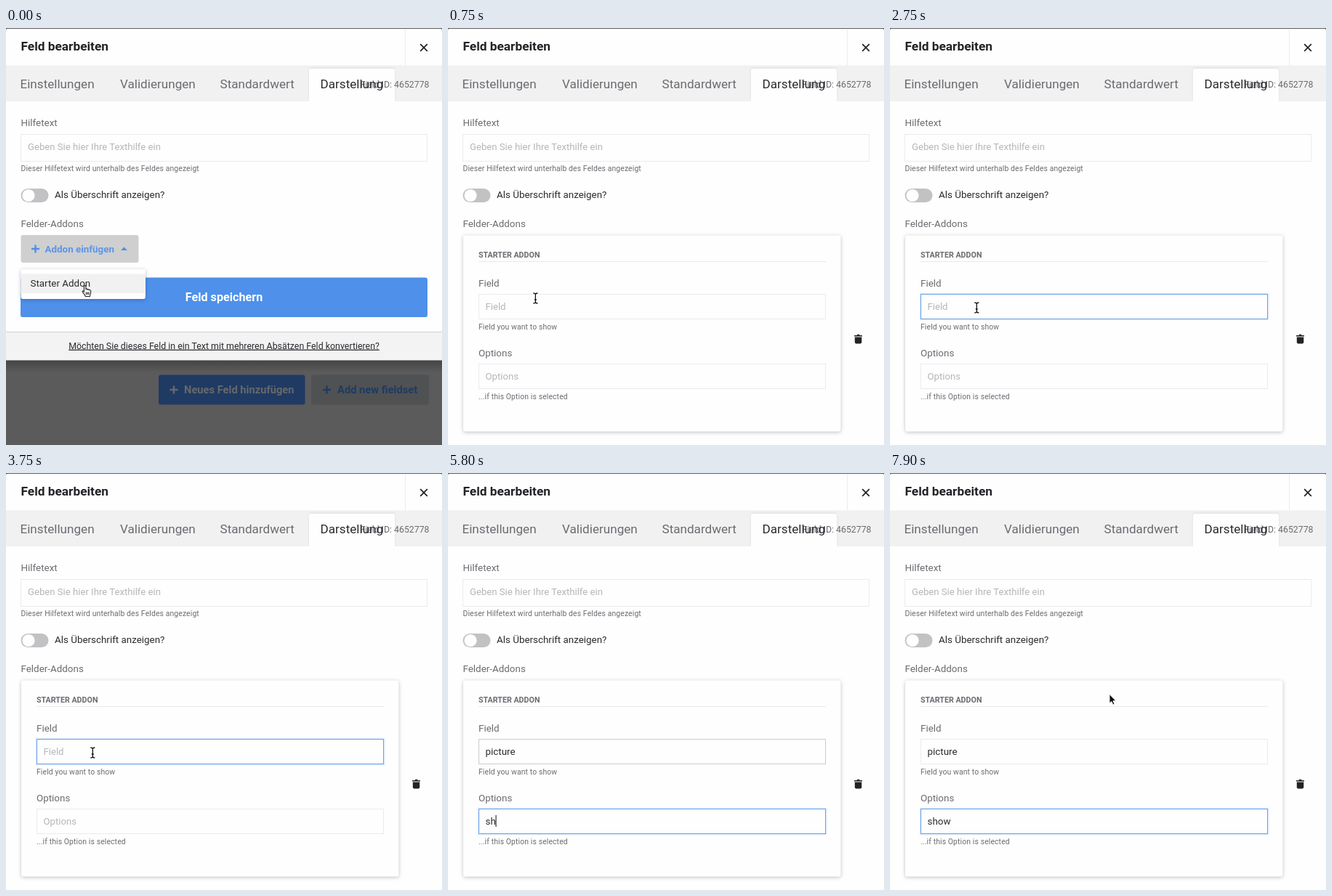
An HTML page that plays this animation: 600 by 574 pixels, repeating every 8000 ms.

```html
<!DOCTYPE html>
<html lang="de">
<head>
<meta charset="utf-8">
<title>Feld bearbeiten</title>
<style>
  html, body { margin: 0; width: 100%; height: 100%; overflow: hidden; background: #5b5b5c; }
  svg { display: block; width: 600px; height: 574px; }
  text { font: 13.4px Roboto, Arial, sans-serif; fill: #6c6b70; white-space: pre; }
  .title { font-size: 17.3px; font-weight: 700; fill: #232327; }
  .tab { font-size: 17.1px; }
  .dark { fill: #2b2b2f; }
  .hint { font-size: 13.15px; fill: #b6b5b9; }
  .help { font-size: 10.4px; letter-spacing: .12px; }
  .bold { font-weight: 700; }
  .box { fill: #fefeff; stroke: #ebeaed; }
  .card { fill: #fefeff; filter: drop-shadow(0 1px 2.5px rgba(0, 0, 0, .25)); }
  .plus { stroke-width: 2.4; fill: none; }
  .glow { fill: none; stroke: #e2eefc; stroke-width: 4; }
  .ring { fill: #fefeff; stroke: #68a0e4; }
  .caret { fill: #222; }
</style>
</head>
<body>
<svg viewBox="0 0 600 574">
  <defs>
    <path id="plus" class="plus" d="M-5.5 0H5.5M0-5.5V5.5"/>
    <path id="arrow" d="M0 0V12.6L2.9 10 4.9 14.6 7 13.7 5.1 9.2H9Z"
      fill="#111" stroke="#fff" stroke-width=".9"/>
    <g id="ibeam" fill="none">
      <path d="M-3-7Q0-7 0-5Q0-7 3-7M0-5V5M-3 7Q0 7 0 5Q0 7 3 7M-1.5 2H1.5" stroke="#fff" stroke-width="2.6"/>
      <path d="M-3-7Q0-7 0-5Q0-7 3-7M0-5V5M-3 7Q0 7 0 5Q0 7 3 7M-1.5 2H1.5" stroke="#111" stroke-width="1.3"/>
    </g>
    <path id="hand" d="M2.4 8.5V1.4C2.4-.4 4.8-.4 4.8 1.4V5.2C5.2 4.3 7 4.4 7.2 5.6C7.9 4.8 9.3 5.1 9.4 6.2C10.3 5.6 11.6 6.2 11.6 7.5V10.2C11.6 12 10.5 12.8 10.4 15H4.3C4 12.7 1.6 11.2.4 9C-.4 7.6 1.1 6.6 2.4 8.5ZM5.3 9V12.5M7.2 9V12.5M9.1 9V12.5"
      fill="#fff" stroke="#222" stroke-width="1.1"/>
    <linearGradient id="drop" x2="0" y2="1">
      <stop stop-color="#000" stop-opacity=".25"/>
      <stop offset="1" stop-color="#000" stop-opacity="0"/>
    </linearGradient>
  </defs>

  <rect width="600" height="574" fill="#5b5b5c"/>
  <rect y="1" width="600" height="580" rx="2" fill="#fefeff"/>

  <!-- header and tabs -->
  <text class="title" x="20.5" y="31">Feld bearbeiten</text>
  <path d="M549.5 1V52" stroke="#ececee"/>
  <path d="M570.2 22.2L579.8 31.8M579.8 22.2L570.2 31.8" stroke="#222226" stroke-width="1.7"/>
  <rect y="51.5" width="600" height="49.5" fill="#f1f1f2"/>
  <path d="M417 101V59Q417 56 420 56H532Q535 56 535 59V101Z" fill="#fefeff"
    style="filter:drop-shadow(0 -1px 1.5px rgba(0,0,0,.07))"/>
  <rect x="410" y="101" width="132" height="6" fill="#fefeff"/>
  <text x="582.5" y="81.5" text-anchor="end" style="font-size:12.3px">Field ID: 4652778</text>
  <text class="tab" x="19.5" y="83.3">Einstellungen</text>
  <text class="tab" x="157" y="83.3">Validierungen</text>
  <text class="tab" x="294.5" y="83.3">Standardwert</text>
  <text class="tab dark" x="432.5" y="83.3">Darstellung</text>

  <!-- general settings -->
  <text x="20.5" y="135">Hilfetext</text>
  <rect class="box" x="20.5" y="146.5" width="559" height="37"/>
  <text class="hint" x="30" y="168.2">Geben Sie hier Ihre Texthilfe ein</text>
  <text class="help" x="20.5" y="197.3">Dieser Hilfetext wird unterhalb des Feldes angezeigt</text>
  <rect x="20.5" y="221" width="38" height="19" rx="9.5" fill="#c2c1c3"/>
  <circle cx="31" cy="230.5" r="8.6" fill="#fefeff"/>
  <text class="dark" x="67" y="234.3">Als Überschrift anzeigen?</text>
  <text x="20.5" y="273.6">Felder-Addons</text>

  <!-- open menu -->
  <g id="menu">
    <rect x="20.5" y="285" width="162" height="38" rx="3" fill="#cfcfd0"/>
    <use href="#plus" x="40.5" y="304" stroke="#4e8fe6"/>
    <text class="bold" x="53.5" y="308.6" style="fill:#5a96e8">Addon einfügen</text>
    <path d="M158 306L162.5 301.5L167 306Z" fill="#4e8fe6"/>
    <rect x="20" y="343.5" width="560" height="54.5" rx="3" fill="#4e90ea"/>
    <text class="bold" x="300" y="376.4" text-anchor="middle" style="font-size:16.2px;fill:#fff">Feld speichern</text>
    <rect y="418" width="600" height="40" fill="#f3f3f4"/>
    <path d="M0 418.5H600" stroke="#cfcfd2"/>
    <text class="dark" x="300" y="441.6" text-anchor="middle"
      style="font-size:12.4px;text-decoration:underline">Möchten Sie dieses Feld in ein Text mit mehreren Absätzen Feld konvertieren?</text>
    <rect y="457.5" width="600" height="117" fill="#5b5b5c"/>
    <rect y="457.5" width="600" height="16" fill="url(#drop)"/>
    <rect x="210" y="477.5" width="201.5" height="41" rx="3" fill="#1f3b63"/>
    <use href="#plus" x="231" y="498" stroke="#66686c"/>
    <text class="bold" x="245" y="503.2" style="font-size:14.7px;fill:#66686c">Neues Feld hinzufügen</text>
    <rect x="420" y="477.5" width="162" height="41" rx="3" fill="#505153"/>
    <use href="#plus" x="441.5" y="498" stroke="#1f3b63"/>
    <text class="bold" x="456" y="503.2" style="font-size:14.7px;fill:#1f3b63">Add new fieldset</text>
    <rect class="card" x="20.5" y="332" width="171.5" height="41" rx="3"/>
    <rect x="20.5" y="338.5" width="171.5" height="26.5" fill="#f1f1f2"/>
    <text class="dark" x="33.5" y="355.8">Starter Addon</text>
  </g>

  <!-- add-on form -->
  <g id="form">
    <rect class="card" x="21" y="285.5" width="519.5" height="270" rx="3"/>
    <text class="bold" x="42" y="316.3" style="font-size:10.7px">STARTER ADDON</text>
    <path d="M42 321.5H520" stroke="#e9e8eb"/>
    <text x="42" y="356">Field</text>
    <text class="help" x="42" y="415">Field you want to show</text>
    <text x="42" y="452">Options</text>
    <text class="help" x="42" y="511">...if this Option is selected</text>
    <path d="M559 423H562.5L563.2 421.8H566L566.7 423H570V424.5H559ZM559.8 425.5H569.3V432.6Q569.3 434.4 567.5 434.4H561.6Q559.8 434.4 559.8 432.6Z" fill="#232327"/>
    <g id="inputs"></g>
  </g>

  <use id="cursor"/>
</svg>

<script>
const LOOP = 8000;
const $ = id => document.getElementById(id);
const show = (el, on) => { el.style.display = on ? '' : 'none'; };
const clamp = v => Math.max(0, Math.min(1, v));
const ease = v => v * v * (3 - 2 * v);

function add(tag, parent, attrs) {
  const el = document.createElementNS('http://www.w3.org/2000/svg', tag);
  for (const k in attrs) el.setAttribute(k, attrs[k]);
  return parent.appendChild(el);
}

// An input at height y; keys are the times at which its letters appear.
function makeInput(y, hint, word, keys, focus, blur) {
  const g = $('inputs');
  const area = { x: 42.5, y, width: 477, height: 34 };
  const box = add('rect', g, { ...area, class: 'box' });
  const lit = add('g', g, {});
  add('rect', lit, { ...area, class: 'glow' });
  add('rect', lit, { ...area, class: 'ring' });
  const label = add('text', g, { x: 51.5, y: y + 21.3 });
  const caret = add('rect', g, { y: y + 8.5, width: 1.1, height: 16, class: 'caret' });

  return t => {
    const typed = word.slice(0, keys.filter(k => k <= t).length);
    label.textContent = typed || hint;
    label.setAttribute('class', typed ? 'dark' : 'hint');
    lit.style.opacity = ease(clamp((t - focus) / 200)) * (1 - ease(clamp((t - blur) / 250)));
    box.style.stroke = t >= blur && t < 6600 ? '#cbcace' : '';

    // The blink restarts with every key.
    const last = Math.max(focus, ...keys.filter(k => k <= t));
    show(caret, t >= focus && t < blur && (t - last) % 1000 < 500);
    caret.setAttribute('x', 51.2 + (typed ? label.getComputedTextLength() : 0));
  };
}

const inputs = [
  makeInput(366.5, 'Field', 'picture', [3800, 4000, 4100, 4350, 4450, 4600, 4650], 1250, 4900),
  makeInput(462.5, 'Options', 'show', [5650, 5800, 6050, 6150], 4900, Infinity)
];

// Pointer stops: time, x, y
const stops = [
  [100, 108, 352.5], [850, 121, 373], [900, 121, 378], [1050, 121, 378], [1250, 119.3, 385],
  [6600, 119.3, 385], [7100, 245, 310], [7650, 245, 310], [7900, 302, 304.5]
];

function pointer(t) {
  const i = stops.findIndex(s => s[0] > t);
  if (i < 0) return stops[stops.length - 1].slice(1);
  if (i === 0) return stops[0].slice(1);
  const [t0, x0, y0] = stops[i - 1], [t1, x1, y1] = stops[i];
  const k = ease((t - t0) / (t1 - t0));
  return [x0 + (x1 - x0) * k, y0 + (y1 - y0) * k];
}

function moveCursor(t) {
  const cursor = $('cursor');
  const menu = t < 50;
  const [x, y] = menu ? [105, 354.5] : pointer(t);
  const shape = menu ? 'hand' : y > 366 && y < 401 ? 'ibeam' : 'arrow';
  cursor.setAttribute('href', '#' + shape);
  cursor.setAttribute('transform', `translate(${x} ${y})`);
  show(cursor, t < 3800 || t >= 6600);
}

function render(t) {
  show($('menu'), t < 50);
  show($('form'), t >= 50);
  inputs.forEach(draw => draw(t));
  moveCursor(t);
}

const start = performance.now();
function tick() {
  render((performance.now() - start) % LOOP);
  requestAnimationFrame(tick);
}
tick();
</script>
</body>
</html>
```
